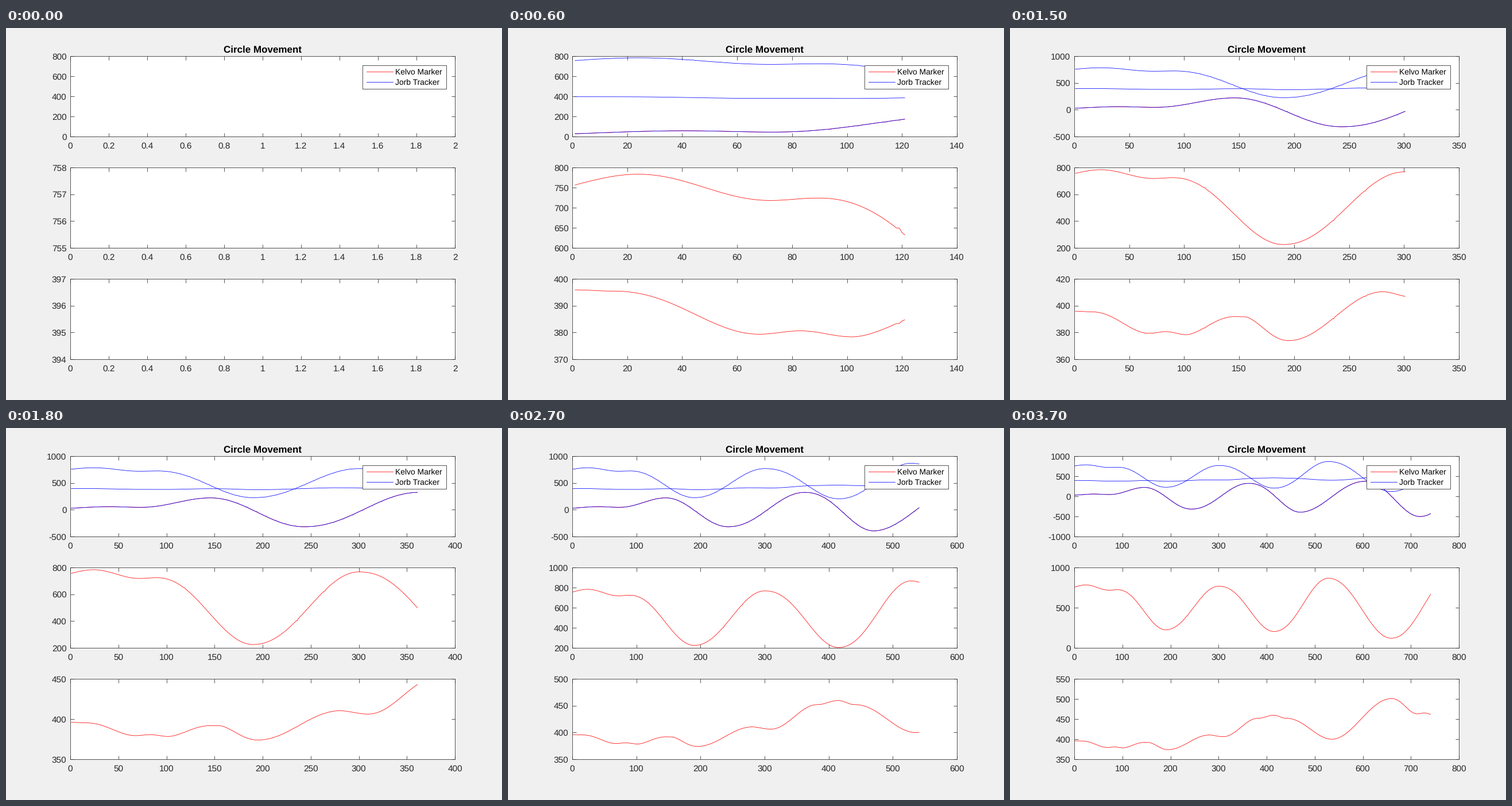
Animation of 864 by 648 pixels, one loop 3.8 s. Source, as a matplotlib script:

```python
import math

import matplotlib.pyplot as plt
import numpy as np
from matplotlib.animation import FuncAnimation
from matplotlib.lines import Line2D
from matplotlib.patches import Rectangle
from matplotlib.transforms import Affine2D

W, H, DPI = 864, 648, 100
PX = 72 / DPI  # points per pixel
THIN = 0.77 * PX
FRAMES, INTERVAL, SAMPLES_PER_FRAME = 38, 100, 20
INK = (0.15, 0.15, 0.15)
RED, BLUE = (1, 0, 0), (0, 0, 1)

plt.rcParams.update({"font.family": "Liberation Sans", "text.hinting": "none"})

# Turning points of each coordinate: sample, position, and the fraction of the
# way to the next turning point at which half of the travel is done.
SWING_X = [
    (-19, 18, 0.5), (41, 57, 0.5), (73, 44, 0.51), (146, 221, 0.5),
    (243, -318, 0.52), (362, 323, 0.545), (470, -395, 0.49),
    (604, 373, 0.53), (719, -503, 0.5), (840, 400, 0.5),
]
SWING_Y = [
    (-24, 731.5, 0.53), (24, 783.3, 0.5), (72, 718, 0.5), (89.5, 724, 0.53),
    (190, 225, 0.52), (300, 767, 0.545), (415, 204, 0.53),
    (528, 866, 0.525), (659, 120, 0.525), (785, 900, 0.5),
]
SWING_Z = [
    (1, 395.9, 0.5), (14, 395.45, 0.545), (68, 379.35, 0.5), (83, 380.6, 0.5),
    (102, 378.35, 0.45), (146, 391.85, 0.5), (155, 391.7, 0.44),
    (195, 373.9, 0.5), (281, 410.4, 0.45), (310, 406.2, 0.5),
    (382, 451.9, 0.5), (415, 459.6, 0.5), (440, 452, 0.52),
    (536, 399.8, 0.49), (660, 500.9, 0.53), (713, 462.9, 0.5),
    (728, 465, 0.5), (760, 455, 0.5),
]


def swing(turns, t):
    """Cosine easing from one turning point to the next."""
    time, value, half = np.array(turns, float).T
    i = np.searchsorted(time, t, side="right") - 1
    u = (t - time[i]) / (time[i + 1] - time[i])
    u = u ** (np.log(0.5) / np.log(half[i]))
    return value[i] + (value[i + 1] - value[i]) * (1 - np.cos(np.pi * u)) / 2


def nice_ticks(lo, hi, max_steps):
    """Ticks with the smallest 1-2-5 step that needs at most max_steps."""
    if lo == hi:
        lo, hi = lo - 1, hi + 1
    for exponent in range(-2, 5):
        for mantissa in (1, 2, 5):
            step = mantissa * 10.0 ** exponent
            first, last = math.floor(lo / step), math.ceil(hi / step)
            if last - first <= max_steps:
                return np.round(np.arange(first, last + 1) * step, 6)


def set_axis(axis, set_limits, ticks):
    axis.set_ticks(ticks, labels=[f"{v:g}" for v in ticks])
    set_limits(ticks[0], ticks[-1])


def make_axes(top):
    ax = fig.add_axes([112 / W, 1 - (top + 140) / H, 670 / W, 140 / H])
    ax.tick_params(direction="in", top=True, right=True, length=6.5 * PX,
                   width=THIN, color=INK, labelcolor=INK, labelsize=15.43 * PX)
    ax.tick_params(axis="x", pad=10 * PX)
    ax.tick_params(axis="y", pad=6.5 * PX)
    for spine in ax.spines.values():
        spine.set(linewidth=THIN, edgecolor=INK)
    return ax


def add_line(ax, color, data):
    line, = ax.plot([], [], color=color, lw=THIN)
    return line, data


def add_legend():
    def place(artist):
        artist.set_transform(pixels)
        fig.add_artist(artist)

    place(Rectangle((621, 106), 146, -41, fc="white", ec=INK, lw=THIN, zorder=5))
    entries = ((76, RED, "Kelvo Marker"), (94, BLUE, "Jorb Tracker"))
    for y, color, label in entries:
        place(Line2D([627.5, 673.5], [y, y], color=color, lw=THIN, zorder=6))
        fig.text(678, y + 5, label, transform=pixels, fontsize=13.9 * PX,
                 va="baseline", zorder=6)


fig = plt.figure(figsize=(W / DPI, H / DPI), dpi=DPI, facecolor=(0.94,) * 3)
# Pixel coordinates with y pointing down.
pixels = Affine2D().scale(1 / W, -1 / H).translate(0, 1) + fig.transFigure

t = np.arange(1, (FRAMES - 1) * SAMPLES_PER_FRAME + 2)
marker_t = t - np.isin(t, (119, 236, 265))  # dropped samples repeat the last one
tracker_t = t - (t % 10 == 4)

axes = [make_axes(top) for top in (49, 243, 437)]
plots = [
    [add_line(axes[0], RED, swing(SWING_X, marker_t))]
    + [add_line(axes[0], BLUE, swing(turns, tracker_t))
       for turns in (SWING_X, SWING_Y, SWING_Z)],
    [add_line(axes[1], RED, swing(SWING_Y, marker_t))],
    [add_line(axes[2], RED, swing(SWING_Z, marker_t))],
]
fig.text(447.5, 42.5, "Circle Movement", transform=pixels, ha="center",
         va="baseline", fontsize=17 * PX, fontweight="bold")
add_legend()


def draw(frame):
    n = frame * SAMPLES_PER_FRAME + 1
    x_ticks = nice_ticks(1, n, 10)
    for ax, lines in zip(axes, plots):
        for line, data in lines:
            line.set_data(t[:n], data[:n])
        lo = min(data[:n].min() for _, data in lines)
        hi = max(data[:n].max() for _, data in lines)
        set_axis(ax.xaxis, ax.set_xlim, x_ticks)
        set_axis(ax.yaxis, ax.set_ylim, nice_ticks(lo, hi, 4))
    return []


anim = FuncAnimation(fig, draw, frames=FRAMES, interval=INTERVAL, repeat=True,
                     init_func=lambda: draw(0))
plt.show()
```
